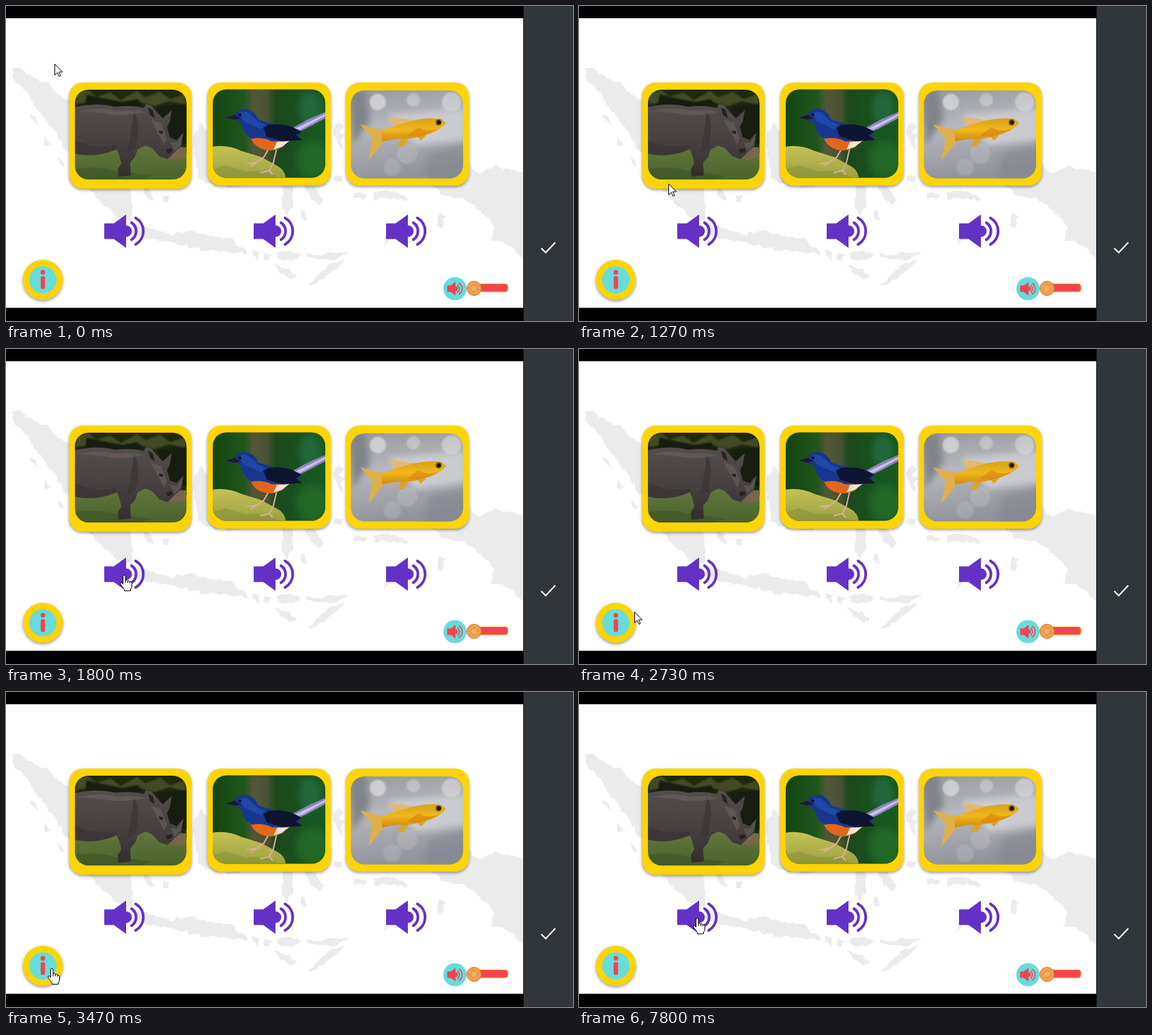
These frames come from a looping animation (831x463 px, 8 s). An HTML page:

```html
<!DOCTYPE html>
<html lang="en">
<head>
<meta charset="utf-8">
<title>Animal sounds</title>
<style>
html, body { margin: 0; width: 100%; height: 100%; overflow: hidden; background: #000; }
svg { display: block; width: 100vw; height: 100vh; }
filter { color-interpolation-filters: sRGB; }
.cursor, .arrow, .hand, .info { animation: 8s step-end infinite; }
.cursor { animation-name: move; }
.arrow { animation-name: arrow; }
.hand { animation-name: hand; }
.info { animation-name: pulse; transform-origin: 54px 402.5px; }

@keyframes move {
  0% { transform: translate(71px, 85px); }
  13.375% { transform: translate(92px, 112px); }
  14.125% { transform: translate(106px, 152px); }
  15% { transform: translate(119px, 205px); }
  15.875% { transform: translate(131px, 261px); }
  16.625% { transform: translate(142px, 313px); }
  17.5% { transform: translate(154px, 358px); }
  18.375% { transform: translate(168px, 377px); }
  19.125% { transform: translate(204px, 373px); }
  20% { transform: translate(236px, 362px); }
  20.875% { transform: translate(244px, 349px); }
  21.625% { transform: translate(212px, 337px); }
  22.5% { transform: translate(173px, 332px); }
  32.5% { transform: translate(147px, 358px); }
  33.375% { transform: translate(112px, 374px); }
  34.125% { transform: translate(81px, 386px); }
  35% { transform: translate(70px, 400px); }
  35.875% { transform: translate(67px, 406px); }
  92.5% { transform: translate(105px, 382px); }
  93.375% { transform: translate(124px, 371px); }
  94.125% { transform: translate(141px, 359px); }
  95% { transform: translate(156px, 347px); }
  95.875% { transform: translate(167px, 338px); }
  97.5%, 100% { transform: translate(173px, 332px); }
}
@keyframes arrow {
  0%, 32.5%, 92.5% { opacity: 1; }
  22.5%, 35%, 95%, 100% { opacity: 0; }
}
@keyframes hand {
  0%, 32.5%, 92.5% { opacity: 0; }
  22.5%, 35%, 95%, 100% { opacity: 1; }
}
@keyframes pulse {
  0%, 43.375%, 100% { transform: none; }
  35.875% { transform: scale(1.24); }
}
</style>
</head>
<body>
<svg viewBox="0 0 831 463" preserveAspectRatio="none">
  <defs>
    <filter id="coast" x="0" y="0" width="831" height="463" filterUnits="userSpaceOnUse">
      <feTurbulence type="fractalNoise" baseFrequency=".09" numOctaves="2" seed="4"/>
      <feDisplacementMap in="SourceGraphic" scale="9" xChannelSelector="R" yChannelSelector="G"/>
    </filter>
    <filter id="shade" x="-20%" y="-20%" width="140%" height="150%">
      <feDropShadow dx="0" dy="2" stdDeviation="2" flood-color="#000" flood-opacity=".4"/>
    </filter>
    <filter id="soft" x="-30%" y="-30%" width="160%" height="160%"><feGaussianBlur stdDeviation="5"/></filter>
    <filter id="haze"><feGaussianBlur stdDeviation="1.2"/></filter>
    <clipPath id="p1"><rect x="101" y="123" width="163.500" height="132" rx="20"/></clipPath>
    <clipPath id="p2"><rect x="303" y="122.500" width="165" height="130" rx="20"/></clipPath>
    <clipPath id="p3"><rect x="505.500" y="124" width="164.500" height="129.500" rx="20"/></clipPath>
    <clipPath id="page"><rect y="18" width="758" height="425.600"/></clipPath>
    <linearGradient id="grass" x2="0" y2="1">
      <stop stop-color="#64763f"/><stop offset="1" stop-color="#48632b"/>
    </linearGradient>
    <linearGradient id="hide" x2="0" y2="1">
      <stop stop-color="#534d4c"/><stop offset=".55" stop-color="#464140"/><stop offset="1" stop-color="#332e2d"/>
    </linearGradient>
    <linearGradient id="forest">
      <stop stop-color="#144413"/><stop offset=".28" stop-color="#1e561b"/>
      <stop offset=".36" stop-color="#525638"/><stop offset=".48" stop-color="#4b5335"/>
      <stop offset=".56" stop-color="#1a481c"/><stop offset="1" stop-color="#175c22"/>
    </linearGradient>
    <linearGradient id="moss" x2="0" y2="1">
      <stop stop-color="#c5c255"/><stop offset="1" stop-color="#98a040"/>
    </linearGradient>
    <linearGradient id="water" x2=".2" y2="1">
      <stop stop-color="#94979c"/><stop offset=".45" stop-color="#b6b8be"/><stop offset="1" stop-color="#92939b"/>
    </linearGradient>
    <linearGradient id="gold" x2="0" y2="1">
      <stop stop-color="#d9a01c"/><stop offset=".5" stop-color="#f1b71a"/><stop offset="1" stop-color="#cf8a14"/>
    </linearGradient>
    <g id="speaker">
      <path d="M0 14q0-1 1-1H14L32 0V49L14 36H1q-1 0-1-1Z"/>
      <path d="M32 16a8.500 8.500 0 0 1 0 17Z"/>
      <g fill="none" stroke="currentColor" stroke-width="4" stroke-linecap="round">
        <path d="M40 12a15 15 0 0 1 0 25M46 5a22.500 22.500 0 0 1 0 39"/>
      </g>
    </g>
  </defs>

  <rect width="831" height="463"/>
  <rect y="18" width="758" height="425.600" fill="#fff"/>

  <g clip-path="url(#page)">
    <g id="map" fill="#ebebeb" filter="url(#coast)">
      <path d="M7 92L22 93 40 105 60 113 76 130 95 142 130 190 180 268 184 280 184 318 164 310 140 288 118 268 92 222 74 188 56 163 42 146 30 126 14 110Z"/>
      <path d="M34 160l9 4 4 9-8-4ZM55 192l8 6 3 9-9-6ZM76 222l6 5 3 10-7-6ZM91 250l6 6 3 8-7-5ZM199 266l14 8 3 12-9-4ZM230 279l9 2-1 8-8-2Z"/>
      <path d="M186 320L215 327 245 336 268 329 300 339 332 342 348 357 354 365 320 362 285 357 248 349 210 342 184 333Z"/>
      <path d="M361 361l13 2-4 8-9-4ZM379 363l12 3-5 8-8-4ZM396 362l24 0 13 5-8 6-25-1ZM440 362l18 5 20-5 22-1-8 8-24 5-28-5ZM394 382l18 3 13 10-5 8-15-9ZM442 408l15-14 20-16 21-4-15 13-20 16-18 8Z"/>
      <path d="M275 184L286 172 300 188 360 180 390 220 382 260 330 267 296 262 284 254 276 225Z"/>
      <path d="M405 250l14 0 1 45-7 14-9-13ZM433 250l13 8 20 27-8 7-20-22ZM432 302l8 2-1 13-6-4Z"/>
      <path d="M478 184l10-17 5 9-4 11 9 3-7 5 3 16-9-9ZM480 250l14 1-2 7-12-2ZM510 274l18 3-4 8-14-4ZM541 273l25-2 23 12-4 5-22-6-22 1Z"/>
      <path d="M612 254L640 240 676 230 692 247 718 235 763 246V377L738 350 710 344 718 326 696 302 674 285 646 281 630 268Z"/>
      <path d="M634 304l10 5-5 18-7-5ZM556 338l6-6-2 14-7 7Z"/>
    </g>
  </g>

  <g fill="#ffd405" filter="url(#shade)">
    <rect x="92.500" y="112.500" width="179.500" height="156" rx="20"/>
    <rect x="295" y="112.500" width="181" height="151.500" rx="20"/>
    <rect x="498" y="112.500" width="180.500" height="151.500" rx="20"/>
  </g>

  <g id="rhino" clip-path="url(#p1)">
    <path fill="#20280f" d="M100 122H266V216H100Z"/>
    <g filter="url(#haze)">
      <path fill="#434b26" d="M103 128l18-4 12 9 20-6 15 11 24-13 12 9 22-8 15 11 22-8v16l-24-5-22 7-25-7-30 6-22-8-37 6Z"/>
      <path fill="#171d10" d="M118 130l22 5 30 6 23-4 8 9-45 4-40-4ZM222 148l43-4v58l-28-3Z"/>
    </g>
    <path fill="url(#grass)" d="M100 208Q185 202 266 208V257H100Z"/>
    <path fill="#3f5427" d="M100 240Q130 234 163 243L190 246 215 250 190 257H100Z" opacity=".6"/>
    <path fill="#78654c" d="M232 216l16-6 16-2v14l-18 5Z"/>
    <path fill="url(#hide)" d="M100 149Q132 141 160 148Q184 145 202 150L205 144 213 146 221 156 230 165 243 153 240 170 236 178 240 193 250 197 260 186 257 206 247 215 237 225 225 221 214 209 204 205 193 211 189 222 182 230 183 249 165 251 164 240 169 231 166 219 162 210Q130 224 100 217Z"/>
    <path fill="#393433" d="M187 152Q199 174 189 210L177 215Q186 177 187 152ZM101 197Q131 211 162 204L162 211Q130 225 100 216Z" opacity=".65"/>
    <path fill="#706765" d="M105 155Q136 147 162 154Q190 151 204 156Q181 161 157 160Q130 155 105 155ZM212 167L227 172 236 194 232 204 221 183ZM241 200l10 1 8-13-3 16-9 9Z" opacity=".5"/>
    <path fill="#272322" d="M208 149l7 4 3 12-7-5ZM224 183l6 1 0 4-5-1ZM234 211l9-2 1 5-7 3Z"/>
  </g>

  <g id="bird" clip-path="url(#p2)">
    <path fill="url(#forest)" d="M302 122H469V254H302Z"/>
    <ellipse cx="445" cy="150" rx="16" ry="24" fill="#2b7450" opacity=".6" filter="url(#soft)"/>
    <ellipse cx="448" cy="226" rx="24" ry="28" fill="#2c7a2d" opacity=".5" filter="url(#soft)"/>
    <path fill="url(#moss)" d="M302 207Q323 203 345 213L374 222 396 234Q410 241 410 254H302Z"/>
    <path fill="#7d8838" d="M302 240L322 234 351 243 384 242 401 254H302Z" opacity=".4"/>
    <g fill="none" stroke="#dcae9c" stroke-width="2">
      <path d="M386 208L378 222 367 230 353 232M367 230L358 236M397 208L392 230 386 242 373 245M386 242L391 248"/>
    </g>
    <path fill="#8984c1" d="M420 179L444 166 470 155V164L438 181 424 187Z"/>
    <path fill="#c6c2df" d="M424 180L469 158V161L431 182Z"/>
    <path fill="#e2661c" d="M358 192Q372 187 389 196L414 198 406 207Q390 215 378 211Q363 207 358 192Z"/>
    <path fill="#f1e6dc" d="M397 200L416 198 404 207 392 211Z"/>
    <path fill="#17368f" d="M322 165L334 160Q340 151 351 151Q364 153 370 167L394 174 418 178 432 184 427 197 390 199Q377 192 360 195Q347 188 345 172L334 167Z"/>
    <path fill="#0e1530" d="M376 176Q402 171 420 178L433 185 425 190 434 197 405 199 382 192Z"/>
    <path fill="#2a58bd" d="M342 158Q350 152 360 161L369 170 383 176 373 181 358 174 348 169Z" opacity=".55"/>
    <path fill="#1a1f2e" d="M322 164L335 160 344 165 335 167Z"/>
    <circle cx="343" cy="160" r="2" fill="#07101e"/>
  </g>

  <g id="fish" clip-path="url(#p3)">
    <path fill="url(#water)" d="M505 123H671V254H505Z"/>
    <g filter="url(#soft)">
      <path fill="#80838a" d="M503 123H526L534 167 508 205Z"/>
      <path fill="#c9cbcf" d="M560 160L675 152V196L600 206Z"/>
      <path fill="#7f818a" d="M620 216L675 204V259H614Z" opacity=".5"/>
    </g>
    <g fill="#e0e0e2" filter="url(#haze)">
      <circle cx="545" cy="141" r="12" opacity=".7"/>
      <circle cx="597" cy="138" r="10" opacity=".45"/>
      <circle cx="653" cy="141" r="14" opacity=".55"/>
      <circle cx="588" cy="217" r="15" opacity=".22"/>
      <circle cx="566" cy="237" r="13" opacity=".2"/>
    </g>
    <path fill="#deb04a" d="M519 174L537 179 557 183 562 190 551 202 543 213 531 227 535 207 537 194Z"/>
    <path fill="#dfb974" d="M562 163L581 165 602 169 592 174 570 178Z"/>
    <path fill="#dca328" d="M580 194L590 195 582 207 574 205ZM602 191L616 190 608 198Z"/>
    <path fill="url(#gold)" d="M551 183Q574 174 598 168Q622 163 638 166L645 172Q638 181 622 187Q597 197 574 195L551 199Z"/>
    <path fill="#d9790d" d="M604 178Q619 187 637 179Q626 188 604 192L587 191Z" opacity=".5"/>
    <circle cx="634" cy="171" r="4.500" fill="#6b5518"/>
    <circle cx="634.500" cy="171" r="2.700" fill="#17160d"/>
  </g>

  <g fill="#6431c6" color="#6431c6">
    <use href="#speaker" x="144" y="306.500"/>
    <use href="#speaker" x="363" y="306.500"/>
    <use href="#speaker" x="557" y="306.500"/>
  </g>

  <g class="info">
    <circle cx="54" cy="402.500" r="29.500" fill="#ffd405" filter="url(#shade)"/>
    <circle cx="54" cy="402.500" r="20" fill="#66dcdb"/>
    <circle cx="54" cy="391.500" r="3.400" fill="#f4444f"/>
    <rect x="50.800" y="397" width="6.400" height="19" rx="3" fill="#f4444f"/>
  </g>

  <g id="volume">
    <circle cx="658" cy="415.500" r="17" fill="#66dcdb"/>
    <use href="#speaker" transform="translate(646.500 405.500) scale(.385 .41)" fill="#f4444f" color="#f4444f"/>
    <rect x="684" y="408.500" width="51.500" height="11.500" rx="4" fill="#f4444f" stroke="#d8a328" stroke-width="1.200"/>
    <circle cx="686" cy="415" r="10.500" fill="#f2a04c" stroke="#c97830"/>
    <circle cx="686" cy="415" r="5" fill="#f4ad61" stroke="#c97a34" stroke-dasharray="2 1"/>
  </g>

  <rect x="758.500" width="72.500" height="463" fill="#31363a"/>
  <path d="M784.500 356L791 362.500 805 347.500" fill="none" stroke="#fff" stroke-width="2.200"/>

  <g class="cursor" fill="#fff" stroke="#000" stroke-linejoin="round">
    <path class="arrow" d="M.5 .5V16.500L4.200 13 6.800 18.500 9 17.500 6.500 12H11.500Z"/>
    <g class="hand">
      <path d="M-1.500 2Q-1.500 .5 .2 .5T2 2V8Q4.500 6.800 5.300 8.800Q7.500 8 8.300 10Q11.500 9.500 11.500 12.500V17Q11 19.500 9.500 21V23.500H.5V21.500L-2.500 17.500-5.300 13.500Q-5.700 11-3.500 11.300L-1.500 13.500Z"/>
      <path d="M2 8V12M5.300 9V12M8.300 10V12.500" fill="none"/>
    </g>
  </g>
</svg>
</body>
</html>
```
